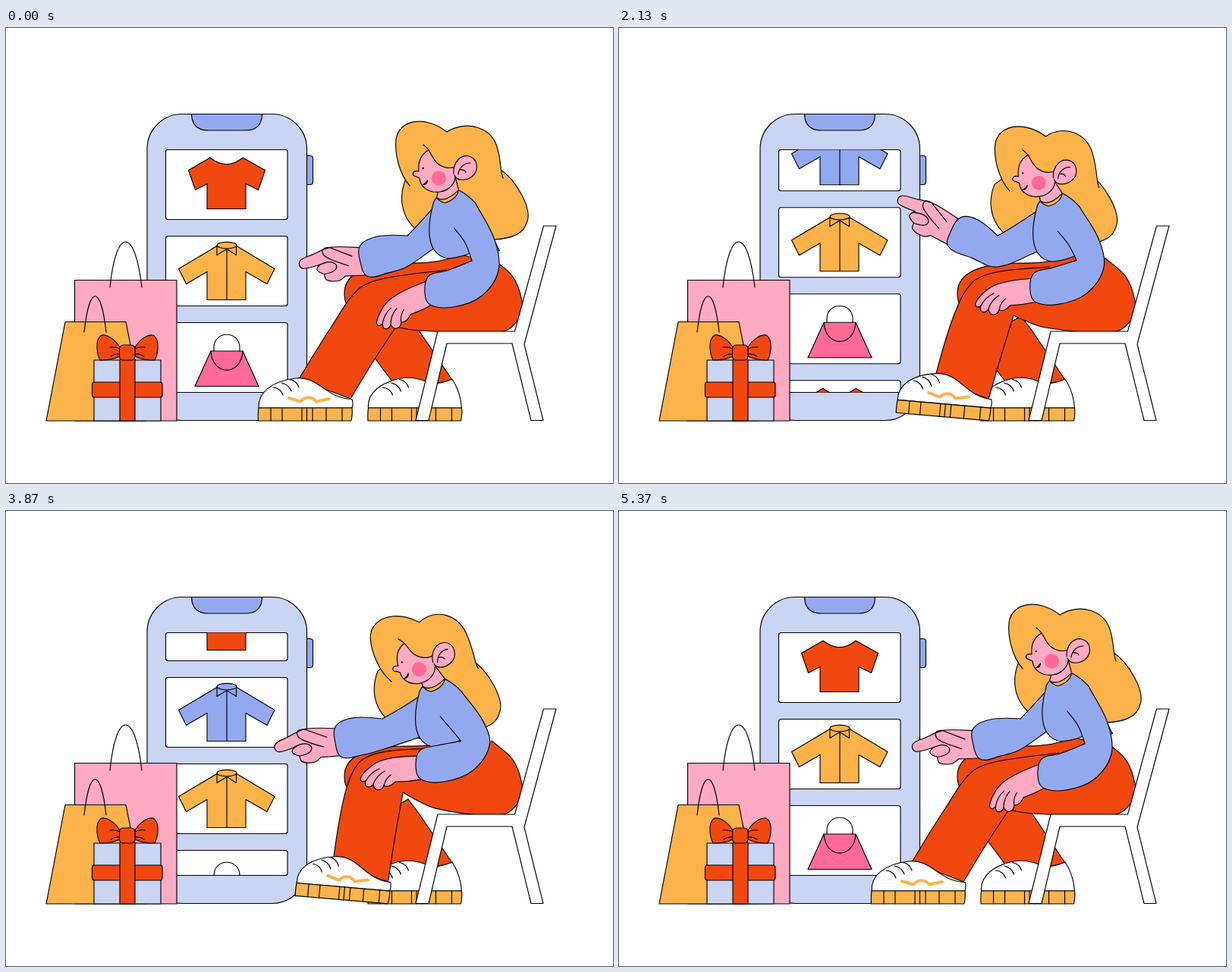
Write an HTML page that moves like this. It is 800 px wide and 600 px high and loops after 5400 ms.

```html
<!DOCTYPE html>
<html lang="en">
<head>
<meta charset="utf-8">
<title>Online shopping</title>
<style>
html, body { margin: 0; width: 100%; height: 100%; overflow: hidden; background: #fff; }
svg { display: block; width: 100vw; height: 100vh; }
.ink { stroke: #000; stroke-width: 1.15; stroke-linejoin: round; stroke-linecap: round; }
.line { fill: none; } .white { fill: #fff; } .pale { fill: #cad4f3; } .blue { fill: #93a9ef; }
.red { fill: #f1480f; } .gold { fill: #fbb34a; } .skin { fill: #feaac3; } .rose { fill: #ff6a98; }
</style>
</head>
<body>
<svg viewBox="0 0 800 600">
<defs>
  <clipPath id="screen"><rect x="210" y="160.5" width="162" height="320"/></clipPath>
  <path id="tee" class="red" d="M269 10.5Q291 28 312 10.5L341.5 27 332.5 53 316 45V78H265V45L249.5 53 240.5 27Z"/>
  <g id="shirt">
    <path d="M278 13L227.5 43 237.5 63 265 47V84H316V47L344 63 354 43 304 13Z"/>
    <path d="M278 13V25L291 17 303.5 25V13M291 17V84"/>
    <ellipse cx="291" cy="12" rx="13" ry="4.2"/>
  </g>
  <g id="purse">
    <path class="rose" d="M270 37.5H312L333 84H249Z"/>
    <path class="line" d="M270 37.5C272 71 310 71 312 37.5M274 37.5V33C274 10 308 10 308 33V37.5"/>
  </g>
  <g id="sole">
    <path class="gold" d="M333 501H456Q457 508 455 518H332.5Q332 508 333 501Z"/>
    <path class="line" d="M349 501V518M364 501V518M390 501V518M396.5 501V518M404 501V518M422 501V518M443 501V518M352 474Q362 475 365 484M363 468Q373 470 376 479M374 463.5Q383 465 386 474"/>
  </g>
  <g id="bow">
    <path class="red" d="M150 421C144 411 134 404 126 405Q119 409 120 423 121 433 124 438Q140 438 150 433Z"/>
    <path class="line" d="M150 423Q144 420 137 421M150 430Q144 429 138 433"/>
  </g>
</defs>

<g class="ink">
  <path class="blue" d="M396 168.5H401Q404.5 168.5 404.5 172V203Q404.5 206.5 401 206.5H396Z"/>
  <rect class="pale" x="186" y="113.5" width="210.5" height="404" rx="46"/>
  <path class="blue" d="M244.5 113.5Q245 135 267 135H316Q337 135 337.5 113.5Z"/>
  <g id="cards"></g>
</g>

<g class="ink">
  <path class="skin" d="M90.5 332.5H225V518H90.5Z"/>
  <path class="line" d="M137 342C145 262 170 262 179 342"/>
  <path class="gold" d="M78 387.5H158L184 518H53Z"/>
  <path class="line" d="M103 401C110 338 125 338 132 401"/>
  <path class="pale" d="M116 438H204V518H116Z"/>
  <rect class="red" x="113.5" y="467" width="92.5" height="20" rx="3"/>
  <path class="red" d="M150 437H170V518H150Z"/>
  <use href="#bow"/>
  <use href="#bow" transform="translate(320) scale(-1 1)"/>
  <rect class="red" x="149.5" y="418" width="20.5" height="20" rx="5"/>
</g>

<g class="ink">
  <path id="backHair" class="gold" d="M-44 2C-52 22 -52 48 -30 68Q0 92 30 96C60 96 60 81 72 81C95 80 112 74 116 58C124 40 100 0 80 -12L0 -30Z"/>
  <path class="red" d="M509 466L470 414 530 380 545 400 588 464Q550 475 509 466Z"/>
  <path class="white" d="M477.5 501C476 482 493 466 526 461Q548 461 560 470 577 468 588 463 599 480 600.5 501Z"/>
  <use href="#sole" x="144.5"/>
  <path class="red" d="M628 305L600 299Q570 311 530 310 446 310 446 350 446 360 450 366L520 370 628 340Z"/>
  <path id="leg" class="red"/>
  <g id="nearShoe">
    <path class="white" d="M333 501C332 482 348 466 381 462C412 458 420 488 456 489.5Q458 495 456 501Z"/>
    <use href="#sole"/>
    <path class="line" d="M373 488L388 492.5 393 488.5Q402 484.5 409 492.5L426 489" stroke="#fbb34a" stroke-width="4"/>
  </g>
  <g id="pointer">
    <path id="pointerShape" class="skin"/>
    <path class="line" d="M-15 -9L-43 -24Q-56 -26 -52 -15 -48 -9 -21 3M-61 -2Q-43 -9 -37 0 -35 9 -54 10"/>
  </g>
  <path id="farSleeve" class="blue"/>
  <g id="cap"><path id="capShape" class="gold"/></g>
  <path id="neck" class="skin"/>
  <g id="face">
    <path class="skin" d="M557 161C546 167 543 178 544 189C536 187 533 195 541 196L545 198C546 211 559 218 572 216C585 214 592 204 592 196L594 182C585 187 575 184 568 178C562 172 560 165 557 161Z"/>
    <path class="line" d="M550 154Q554 157 557 161"/>
    <path class="skin" d="M590 192C589 176 600 167 610 169C622 172 624 188 614 196C606 202 594 202 591 194"/>
    <path class="line" d="M596 193C597 184 604 178 612 178M598 187Q604 186 606 190"/>
    <circle class="rose" cx="570.5" cy="198" r="9.5" stroke="none"/>
    <circle cx="549.7" cy="185" r=".6"/>
    <path d="M549 207Q555 207 555.5 201 553 205 549 207Z"/>
  </g>
  <path id="torso" class="blue" d="M544 240C538 262 537 285 545 298Q553 310 566 310 585 308 600 300L632 300 600 237Q590 226 578 220 576 232 560 237 552 235 549 230 545 234 544 240Z"/>
  <g id="nearHand">
    <path class="skin" d="M2 -16C-20 -16 -40 -14 -53 -9C-66 -3 -76 8 -78 14Q-78 20 -71 17 -73 25 -67 25 -63 25 -61 21 -60 29 -55 29 -49 29 -47 23 -41 27 -32 18 -15 18 2 15"/>
    <path class="line" d="M-71 17Q-64 5 -53 1M-61 21Q-56 9 -46 4M-47 23Q-45 14 -38 9"/>
  </g>
  <path id="nearSleeve" class="blue"/>
  <path class="white" d="M708.5 261H725L683 417 708 517.5H692L667 416H581L557 517.5H540L569 400H670.5Z"/>
</g>
</svg>

<script>
const LOOP = 5400;
const $ = id => document.getElementById(id);
const lerp = (a, b, k) => a + (b - a) * k;
const mix = (p, q, k) => p.map((v, i) => lerp(v, q[i], k));
const add = (p, q, k = 1) => [p[0] + q[0] * k, p[1] + q[1] * k];
const sub = (p, q) => add(p, q, -1);
const clamp = u => Math.min(1, Math.max(0, u));
const wave = u => (1 - Math.cos(Math.PI * clamp(u))) / 2;
const rotate = ([x, y], degrees) => {
  const a = degrees * Math.PI / 180, c = Math.cos(a), s = Math.sin(a);
  return [x * c - y * s, x * s + y * c];
};
const draw = (id, d) => $(id).setAttribute('d', d);
const place = (id, [x, y], angle = 0, [px, py] = [0, 0]) =>
  $(id).setAttribute('transform', `translate(${x} ${y}) rotate(${angle}) translate(${-px} ${-py})`);

// Smooth open curve through points; tangents vanish at the sharp ones.
function curve(pts, sharp = []) {
  const at = i => pts[Math.min(pts.length - 1, Math.max(0, i))];
  const handle = (i, next) => {
    if (sharp.includes(i)) return at(i);
    const along = sub(at(i + 1), at(i - 1));
    const reach = Math.hypot(...sub(at(next), at(i))) / 3 / Math.hypot(...along);
    return add(at(i), along, reach * (next - i));
  };
  return 'M' + pts[0] + pts.slice(1).map((p, i) => `C${handle(i, i + 1)} ${handle(i + 1, i)} ${p}`).join('');
}

// head: cheek x, y, tilt, hair swing; wrist: pointing hand x, y, angle; rest: hand on the knee
const sit = { head: [570.5, 198, 0, 0], wrist: [472, 308, -7], rest: [557, 350, -20] };
const poses = [
  { t: 0, ...sit },
  { t: 810, head: [544, 207, -3, -3], wrist: [441, 274, 0], rest: [556, 346, 0] },
  { t: 1500, head: [551, 206, -6, -16], wrist: [442, 267, 13], rest: [551, 344, 0] },
  { t: 2820, head: [555.5, 202, 4.5, -12], wrist: [442, 273, 36], rest: [542, 349, -6] },
  { t: 3450, head: [544, 208.5, -6, -17], wrist: [438, 308, -16], rest: [542, 344, -3] },
  { t: 4350, head: [545, 209, -14, -2], wrist: [440, 301, 0], rest: [549, 333, 4] },
  { t: LOOP - 30, ...sit }
];

function poseAt(t) {
  const next = poses.findIndex(p => p.t > t);
  if (next < 0) return sit;
  const a = poses[next - 1], b = poses[next], k = wave((t - a.t) / (b.t - a.t));
  return Object.fromEntries(Object.keys(sit).map(part => [part, mix(a[part], b[part], k)]));
}

const TOP = 160.5, BOTTOM = 480.5, PITCH = 114, CARD = 92;
const goods = { t: ['tee', 'red'], y: ['shirt', 'gold'], s: ['shirt', 'blue'], b: ['purse', 'rose'] };
const cards = [...'tybtsybtyb'].map(kind => {
  const [shape, color] = goods[kind];
  $('cards').insertAdjacentHTML('beforeend',
    `<g><rect class="white" x="210.5" width="160.5" rx="3"/><g clip-path="url(#screen)"><use href="#${shape}" class="${color}"/></g></g>`);
  const node = $('cards').lastElementChild;
  return { node, rect: node.querySelector('rect'), item: node.querySelector('use') };
});

// [start, end, distance]
const swipes = [[637, 1437, 397], [1750, 2600, 231], [2640, 3790, -231], [4257, 5057, -397]];
const steps = [[640, 1210, 29.5], [1850, 2420, 23], [3560, 4130, -23], [4330, 4900, -29.5]];
const travel = (moves, t, ease) => moves.reduce((sum, [a, b, d]) => sum + d * ease((t - a) / (b - a)), 0);

function scrollCards(t) {
  const offset = travel(swipes, t, wave);
  cards.forEach(({ node, rect, item }, i) => {
    const y = TOP + i * PITCH - offset;
    const y0 = Math.max(TOP, y), y1 = Math.min(BOTTOM, y + CARD);
    node.style.display = y1 > y0 ? '' : 'none';
    rect.setAttribute('y', y0);
    rect.setAttribute('height', Math.max(0, y1 - y0));
    item.setAttribute('y', y);
  });
}

// The foot lifts its toe, then slides; the knee follows.
function drawLeg(t) {
  const dx = travel(steps, t, u => wave(u) ** 3), k = dx / 52.5;
  const tilt = steps.reduce((sum, [a, b]) => sum + 5 * Math.sin(Math.PI * clamp((t - a) / (b - a))), 0);
  place('nearShoe', [456 + dx, 518], tilt, [456, 518]);
  draw('leg', curve([
    [580 - 20 * k, 319 - 7 * k], [500 - 5 * k, 330 - 13 * k], [465, 344 - 13 * k], [430 + 18 * k, 392 - 20 * k],
    [386 + 49 * k, 463], [454 + 54 * k, 489], [485 + 30 * k, 438 - 8 * k], [514 + 10 * k, 394 - 25 * k],
    [545 + 25 * k, 399 - 7 * k], [655, 400], [678, 380], [680, 360], [668, 328], [640, 303]
  ], [4, 5, 7]));
}

function drawHead([x, y, tilt, swing], shift) {
  const cheek = [570.5, 198];
  const droop = 12 * (1 - shift[0] / 18.5);
  const hang = (px, py, side, down) => `${px - droop * side} ${py + droop * down}`;
  place('backHair', [x + swing, y]);
  place('cap', [x, y], tilt, cheek);
  place('face', [x, y], tilt, cheek);
  draw('capShape', `M532 208C518 192 512 165 514 147C518 120 553 115 581 137
    C${hang(607, 121, .2, 0)} ${hang(641, 130, .5, .4)} ${hang(648, 160, .6, .6)}
    C${hang(653, 178, .6, 1)} ${hang(651, 188, .6, 1)} ${hang(655, 198, .65, 1)}`);
  const jaw = p => add([x, y], rotate(p, tilt));
  const [left, mid, right] = [[549, 230], [560, 238], [578, 220]].map(p => add(p, shift));
  draw('neck', `M${jaw([0, 15])}L${left}Q${mid} ${right}L${jaw([22, 0])}`);
}

function drawFarArm([x, y, angle], shift) {
  const wrist = [x, y], knuckle = [-45, -14];
  const bend = Math.min(0, angle);
  const index = [[-66, -20], [-82, -17], [-86, -11], [-82, -5], [-58, -5]]
    .map(p => add(knuckle, rotate(sub(p, knuckle), bend)));
  place('pointer', wrist, angle);
  draw('pointerShape', curve([[2, -18], [-41, -24], ...index,
    [-63, 3], [-54, 10], [-52, 18], [-36, 21], [-27, 16], [-1, 18]], [6, 8, 11]));

  const elbow = [x + 57, 274], under = add(elbow, [-1, 41]);
  const forearm = sub(wrist, mix(elbow, under, .5));
  const u = forearm.map(v => v / Math.hypot(...forearm)), n = [-u[1], u[0]];
  const cuffTop = add(wrist, n, 22), cuffLow = add(wrist, n, -20);
  draw('farSleeve', curve([
    add([545, 243], shift), mix(add([543, 246], shift), elbow, .5), elbow,
    add(mix(elbow, cuffTop, .6), n, 7), cuffTop, add(wrist, u, 5), cuffLow,
    add(mix(cuffLow, under, .5), n, -2), under, add([545, 297], shift)
  ], [2]));
}

// Each sleeve point follows the shoulder by its weight and the wrist by the rest.
const sleeve = [
  [572, 270, 1], [588, 288, .9], [606, 307, .4], [580, 316, 0], [556, 323, 0], [551, 345, 0],
  [558, 361, 0], [588, 364, 0], [625, 350, 0], [648, 316, 0], [634, 280, .5], [600, 237, 1]
];
function drawNearArm([x, y, angle], shift) {
  const pull = sub([x, y], [556, 346]);
  place('nearHand', [x, y], angle);
  draw('nearSleeve', curve(sleeve.map(([px, py, w]) => add([px, py], mix(pull, shift, w))), [2]));
}

function render(t) {
  const { head, wrist, rest } = poseAt(t);
  const shift = [(head[0] - 544) * .7, (head[1] - 207) * .7];
  scrollCards(t);
  drawLeg(t);
  drawFarArm(wrist, shift);
  drawHead(head, shift);
  place('torso', shift);
  drawNearArm(rest, shift);
}

const start = performance.now();
function tick() {
  render((performance.now() - start) % LOOP);
  requestAnimationFrame(tick);
}
tick();
</script>
</body>
</html>
```
